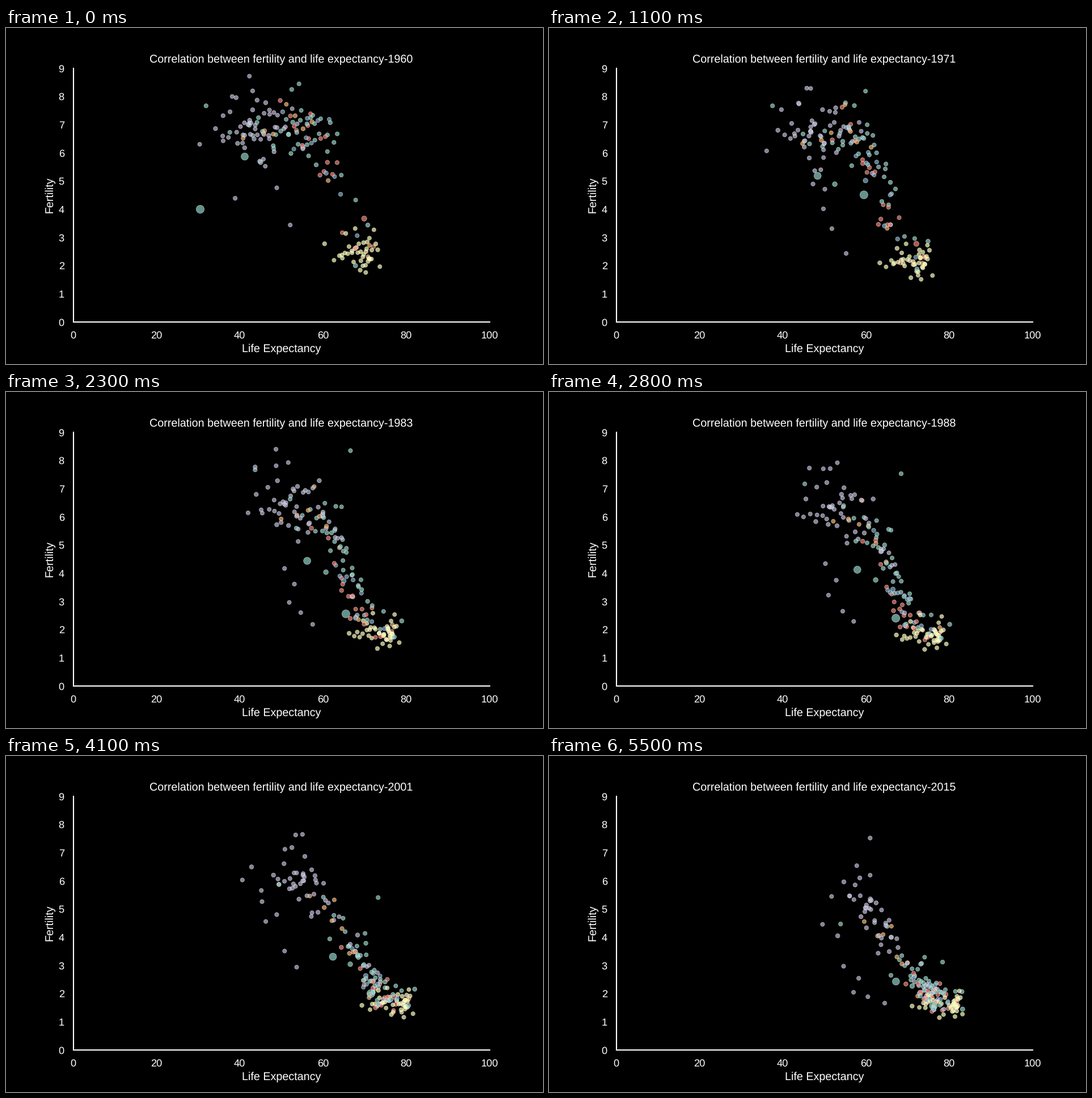
A matplotlib script that plays this animation: 947x592 px, repeating every 5600 ms.

```python
import numpy as np
import matplotlib.pyplot as plt
from matplotlib.animation import FuncAnimation

W, H, DPI = 947, 592, 128
YEARS = np.arange(1960, 2016)
T = np.linspace(0, 1, len(YEARS))
EASE = 1 - (1 - T) ** 1.3

TEAL, YELLOW, VIOLET = "#8dd3c7", "#ffffb3", "#bebada"
RED, BLUE, ORANGE = "#fb8072", "#80b1d3", "#fdb462"

rng = np.random.default_rng(5)
dots = []  # (colour, life series, fertility series, diameter in pixels)


def px(n):
    """Pixels to points."""
    return n * 72 / DPI


def bump(year, width):
    return np.exp(-((YEARS - year) / width) ** 2 / 2)


def spread(n):
    """Evenly filled bell-shaped scores in random order."""
    p = (np.arange(n) + 0.5) / n
    return rng.permutation(np.log(p / (1 - p)) / 1.81)


def birth_rate(life, shift, score):
    """Many births in short lives, few in long ones; the step softens over time."""
    high = 6.9 - 0.8 * T
    low = 1.55 + 0.85 * (1 - T) ** 2
    step = 1 / (1 + np.exp((life - 64 - T - shift) / (2 + 2.5 * T)))
    sd = 0.09 + 0.06 * (1 - step)
    return (low + (high - low) * step) * np.exp(sd * score)


def group(color, n, start, end, sd, shift=0, dip=0):
    """Countries whose life expectancy eases from start to end, with a dip near 2001."""
    mean = start + (end - start) * EASE - dip * bump(2001, 8)
    width = sd[0] + (sd[1] - sd[0]) * T
    for a, b in zip(spread(n), spread(n)):
        f1, f2 = rng.uniform(0, 2 * np.pi, 2)
        life = mean + width * (a + 0.12 * np.sin(2 * np.pi * T + f1))
        fert = birth_rate(life, shift, b + 0.25 * np.sin(3 * np.pi * T + f2))
        dots.append((color, np.minimum(life, 83.3), fert, 7.2 + 0.5 * rng.random() ** 2))


def track(color, life, fert, size=7.4, crash=0, fert_drop=0):
    """One country through 1960, 1983 and 2015, less a short crisis."""
    keys = (1960, 1983, 2015)
    dots.append((color, np.interp(YEARS, keys, life) - crash,
                 np.interp(YEARS, keys, fert) - fert_drop, size))


# Africa: centre, south, north and islands
group(VIOLET, 36, 42.5, 62, (4.9, 3.8), shift=1, dip=4)
group(VIOLET, 7, 46, 59, (4, 5), shift=-14, dip=10)
group(VIOLET, 8, 49, 75, (4, 2.4), shift=2)
# Asia
group(TEAL, 37, 55, 74.5, (7, 3.8), shift=2)
# Europe: west, east
group(YELLOW, 19, 70.5, 81.5, (1.5, 0.8), shift=-7)
group(YELLOW, 20, 66.8, 76, (3, 2.3), shift=-7)
# North and South America
group(RED, 19, 58.5, 75.5, (6.5, 3), shift=-1)
group(BLUE, 11, 59, 75.5, (5.5, 2.5))
# Oceania
group(ORANGE, 8, 51.5, 66.3, (7, 4.4))
group(ORANGE, 2, 71, 81.8, (0.3, 0.4))

# Countries that stand apart
track(VIOLET, (36, 43.7, 61), (7.32, 7.77, 7.52))
track(VIOLET, (38.9, 56.4, 67.4), (4.39, 5.45, 3.95))
track(VIOLET, (43.1, 48.7, 66), (8.2, 8.4, 4), crash=41.5 * bump(1994, 0.35))
track(TEAL, (31.9, 43.7, 53.9), (7.67, 7.67, 4.47))
track(TEAL, (44.5, 66.6, 78.4), (7.25, 8.35, 3.12))
track(TEAL, (42.3, 56, 66), (6.98, 5.6, 2.65), crash=34.5 * bump(1977, 2.6))
track(TEAL, (67.8, 77.1, 83.2), (2, 1.74, 1.45), 8)
track(BLUE, (55.2, 65, 74.4), (6.2, 3.73, 1.78), 8.5)
track(TEAL, (45, 60.7, 71.1), (5.67, 4.04, 2.27), 8.6)
track(RED, (69.9, 74.5, 79.1), (3.67, 1.8, 1.97), 9.2)
track(TEAL, (41.2, 56.2, 67.2), (5.87, 4.44, 2.43), 12.8)
track(TEAL, (54, 65.5, 76.2), (6.3, 2.56, 1.57), 14.2,
      crash=23.5 * bump(1960, 1), fert_drop=2.3 * bump(1960, 1))

rng.shuffle(dots)
colors, life, fert, diameter = zip(*dots)
points = np.stack((life, fert), axis=-1)

plt.rcParams.update({"font.family": "Liberation Sans", "text.hinting": "none"})
fig, ax = plt.subplots(figsize=(W / DPI, H / DPI), dpi=DPI, facecolor="black")
fig.subplots_adjust(left=118.6 / W, right=852.6 / W, bottom=0.125, top=0.88)
ax.set_facecolor("black")
ax.set(xlim=(0, 100), ylim=(0, 9), xticks=range(0, 101, 20), yticks=range(10))
ax.tick_params(length=0, pad=px(15.83), labelsize=px(18.2), labelcolor="white")
for side, spine in ax.spines.items():
    spine.set_visible(side in ("left", "bottom"))
    spine.set_color("white")
    spine.set_linewidth(px(2.08))
text = dict(fontsize=px(19.8), color="white")
ax.set_xlabel("Life Expectancy", labelpad=px(6), **text)
ax.set_ylabel("Fertility", labelpad=px(6.67), **text)
title = ax.set_title("", pad=px(10), **text)
cloud = ax.scatter(*points[:, 0].T, s=px(np.array(diameter)) ** 2, c=colors,
                   alpha=0.7, edgecolors="white", linewidths=px(0.6))


def update(i):
    cloud.set_offsets(points[:, i])
    title.set_text(f"Correlation between fertility and life expectancy-{YEARS[i]}")
    return cloud, title


anim = FuncAnimation(fig, update, frames=len(YEARS), interval=100,
                     init_func=lambda: update(0), repeat=True, repeat_delay=0)
plt.show()
```
